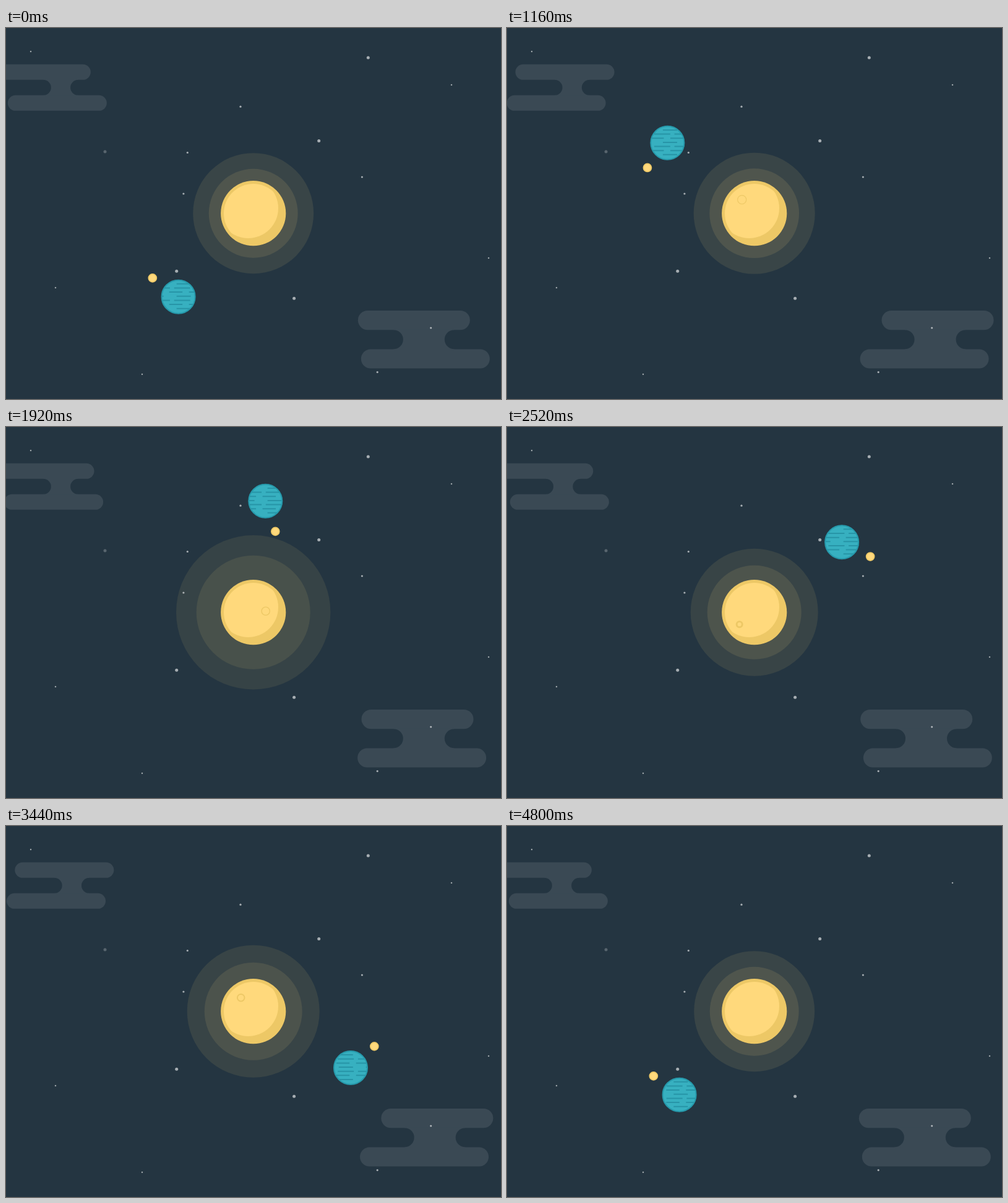
Recreate the animation shown at these times as an HTML page. Size 800 px wide and 600 px high, loop 4840 ms.

```html
<!DOCTYPE html>
<html lang="en">
<head>
<meta charset="utf-8">
<title>Orbit</title>
<style>
  html, body { margin: 0; height: 100%; overflow: hidden; background: #243541; }
  svg { display: block; width: 100vw; height: 100vh; }
</style>
</head>
<body>
<svg id="stage" viewBox="0 0 800 600">
  <defs>
    <clipPath id="sunClip"><circle r="47.7"/></clipPath>
    <clipPath id="planetClip"><circle r="27"/></clipPath>
  </defs>
  <rect width="800" height="600" fill="#243541"/>
  <g id="clouds" fill="#3a4954"></g>
  <g id="halo" fill="#ffd97c" transform="translate(399.7 299.7)"><circle/><circle/></g>
  <g id="stars" fill="#fff"></g>
  <g transform="translate(399.7 299.7)">
    <circle r="52.6" fill="#edc866"/>
    <g clip-path="url(#sunClip)"><circle cx="-8.3" cy="-8.3" r="48.6" fill="#ffd97c"/></g>
    <g id="bubbles" fill="none" stroke="#edc866"></g>
  </g>
  <g id="planet">
    <circle r="27.5" fill="#37b0c0"/>
    <g id="bands" stroke="#2795a7" stroke-width="2" clip-path="url(#planetClip)"></g>
    <circle r="27" fill="none" stroke="#2699ab" stroke-width="2"/>
  </g>
  <circle id="moon" r="6.5" fill="#ffd97c" stroke="#edc866" stroke-width="1.7"/>
</svg>
<script>
const LOOP = 4840;
const $ = id => document.getElementById(id);

function set(el, attrs) {
  for (const k in attrs) el.setAttribute(k, attrs[k]);
  return el;
}
function add(parent, tag, attrs) {
  return parent.appendChild(set(document.createElementNS(parent.namespaceURI, tag), attrs));
}
const move = (el, x, y) => el.setAttribute('transform', `translate(${x} ${y})`);
const polar = (r, deg) => [r * Math.cos(deg * Math.PI / 180), r * Math.sin(deg * Math.PI / 180)];
const inOut = (x, p) => x < .5 ? (2 * x) ** p / 2 : 1 - (2 - 2 * x) ** p / 2;
// Time to the nearest multiple of the period
const toNearest = (t, period) => Math.min(t % period, period - t % period);

// One size and brightness per group of stars
function stars(r, opacity, ...points) {
  for (const [cx, cy] of points) add($('stars'), 'circle', { cx, cy, r, opacity });
}
stars(2.5, .6, [585.3, 48], [505.7, 182.6], [275.7, 393.3], [465.6, 437.2]);
stars(1.6, .6, [379, 127.2], [293.3, 201.5], [575.4, 241], [286.9, 268], [686.7, 485], [600.2, 556.6]);
stars(1.25, .55, [40, 38], [720, 92], [780, 372], [80, 420], [220, 560]);
stars(2.5, .24, [160, 200]);

// Two pills joined by a waist with round notches
function cloud(y, h, top, low, waist) {
  const r = h / 2;
  const bar = ([x, width], y) => add($('clouds'), 'rect', { x, y, width, height: h, rx: r });
  const arc = dy => `a${r} ${r} 0 0 1 0 ${dy}`;
  const d = `M${waist[0] - r} ${y + h - 1}v1${arc(h)}v1h${waist[1] + h}v-1${arc(-h)}v-1z`;
  return {
    top: bar(top, y),
    low: bar(low, y + 2 * h),
    waist: add($('clouds'), 'path', { d })
  };
}
const clouds = [
  cloud(58.8, 25, [-23, 160], [3, 160], [73, 31.3]),
  cloud(457, 31.2, [569, 181], [574, 208], [642, 67])
];

const bubbles = [[-24, 19.5], [-20, -22], [20, -2]]
  .map(([cx, cy]) => add($('bubbles'), 'circle', { cx, cy }));

// Three dash patterns (dash, gap, start) repeat down the planet
const dashes = [[23, 21, 27], [26, 6.7, 23], [21.5, 10.5, 15]];
const bands = Array.from({ length: 7 }, (_, i) => {
  const y = 6.65 * (i - 3) - .9;
  const [on, off, start] = dashes[i % 3];
  const line = add($('bands'), 'line', { x1: -30, x2: 30, y1: y, y2: y, 'stroke-dasharray': `${on} ${off}` });
  return { line, start };
});

function drawClouds(t) {
  const drift = 7.9 + polar(10, .15 * (t - 960))[0];
  const shear = 20 * inOut(toNearest(t, 2400) / 1200, 2.5);
  for (const c of clouds) {
    move(c.top, drift + shear, 0);
    move(c.low, drift - shear, 0);
    move(c.waist, drift, 0);
  }
}

// Swells, holds, and shrinks back every 1200 ms
function drawHalo(t) {
  const k = inOut(Math.min(toNearest(t, 1200) / 380, 1), 2);
  const r = 97.5 + 27.2 * k;
  const [outer, inner] = $('halo').children;
  set(outer, { r, opacity: .094 - .01 * k });
  set(inner, { r: r * .738, opacity: .11 - .02 * k });
}

function drawBubbles(t) {
  bubbles.forEach((el, i) => {
    const age = (t - i * 800 + 2400) % 2400;
    const w = 3.8 - .0075 * age;
    const on = age > 5 && w > 0;
    el.style.display = on ? '' : 'none';
    if (on) set(el, { r: 5.2 + .0066 * age - w / 2, 'stroke-width': w });
  });
}

function drawPlanet(t) {
  const turn = .075 * t;
  const [px, py] = polar(181.3, 132 + turn);
  const [mx, my] = polar(51.6, 216 - turn);
  move($('planet'), 400.1 + px, 300.1 + py);
  move($('moon'), 400.1 + px + mx, 300.1 + py + my);
  for (const { line, start } of bands) line.setAttribute('stroke-dashoffset', -(start + .072 * t));
}

const begin = performance.now();
function frame() {
  const t = (performance.now() - begin) % LOOP;
  drawClouds(t);
  drawHalo(t);
  drawBubbles(t);
  drawPlanet(t);
  requestAnimationFrame(frame);
}
frame();
</script>
</body>
</html>
```
